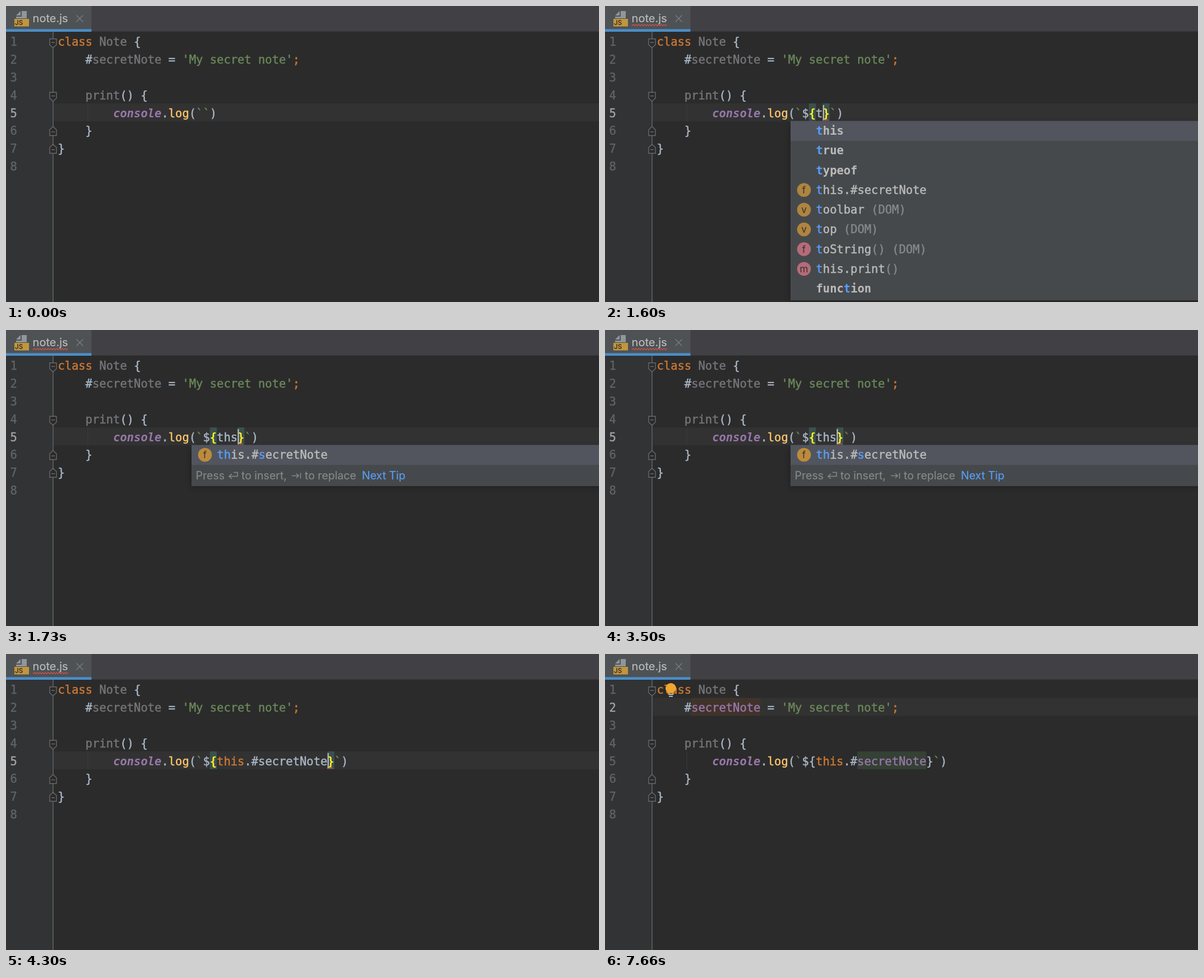
Recreate the animation shown at these times as an HTML page. Size 1058 px wide and 529 px high, loop 8 s.

```html
<!DOCTYPE html>
<html lang="en">
<head>
<meta charset="utf-8">
<title>note.js</title>
<style>
  html, body { margin: 0; width: 100%; height: 100%; overflow: hidden; background: #2b2b2b; }
  svg { display: block; width: 1058px; height: 529px; }
  .mono { font: 20.48px "DejaVu Sans Mono", monospace; stroke-width: .45px; }
  .ui { font: 19.5px Inter, sans-serif; stroke-width: .2px; }
  .bold { font-weight: bold; stroke-width: 0; }
  .em { font-weight: bold; font-style: italic; stroke-width: 0; }
</style>
</head>
<body>
<svg id="stage" viewBox="0 0 1058 529" xmlns="http://www.w3.org/2000/svg">
  <defs>
    <filter id="blur" x="-10%" y="-30%" width="120%" height="160%"><feGaussianBlur stdDeviation="6"/></filter>
  </defs>
  <rect width="1058" height="529" fill="#2b2b2b"/>
  <rect y="46" width="84" height="483" fill="#313335"/>
  <g id="editor"></g>
  <rect width="1058" height="45" fill="#414145"/>
  <rect y="45" width="1058" height="1" fill="#353537"/>
  <rect width="152.5" height="42" fill="#4e5254"/>
  <rect y="41.3" width="152.5" height="4.7" fill="#4a8ec8"/>
  <path d="M28 9H37V22H18V19H28ZM18 17L26 9V17Z" fill="#8f969c"/>
  <rect x="15" y="23" width="26" height="13.5" fill="#c2953f"/>
  <text x="16" y="34.3" font-family="Inter, sans-serif" font-size="11.5" font-weight="600" fill="#3b3222">JS</text>
  <text x="47.6" y="29" class="ui" style="font-size:20px" fill="#bbbbbb" stroke="#bbbbbb">note.js</text>
  <path d="M125.5 16.5L137.5 28.5M137.5 16.5L125.5 28.5" stroke="#797d80" stroke-width="1.4"/>
  <g id="overlay"></g>
</svg>
<script>
const LOOP = 8000;
const LEFT = 92.5, CELL = 12.33, TOP = 46.7, ROW = 31.85, BASELINE = 24.5;
const C = {
  text: '#a9b7c6', dim: '#757579', key: '#cc7832', str: '#6a8759', fn: '#ffc66d',
  field: '#9876aa', brace: '#ffef28', match: '#589df6', item: '#bbbbbb', tail: '#868788'
};
const colX = col => LEFT + col * CELL;
const rowY = row => TOP + (row - 1) * ROW;
const between = (t, a, b) => t >= a && t < b;

const rect = (x, y, w, h, fill) =>
  `<rect x="${x}" y="${y}" width="${w}" height="${h}" fill="${fill}"/>`;
const text = (x, y, str, color, cls = 'mono') =>
  `<text x="${x}" y="${y}" class="${cls}" fill="${color}" stroke="${color}">${str}</text>`;
const cells = (row, col, count, fill) =>
  rect(colX(col), rowY(row), count * CELL, ROW, fill);

// Lays out [string, colour, style] tokens one after another on the character grid.
function run(x, y, tokens) {
  return tokens.map(([str, color, cls = '']) => {
    const out = text(x, y, str, color, 'mono ' + cls);
    x += str.length * CELL;
    return out;
  }).join('');
}
const code = (row, col, tokens) => run(colX(col), rowY(row) + BASELINE, tokens);

function wave(x1, x2, y) {
  let d = `M${x1} ${y}`;
  for (let x = x1 + 2.5, up = true; x <= x2; x += 2.5, up = !up) d += `L${x} ${up ? y - 2.6 : y}`;
  return `<path d="${d}" fill="none" stroke="#d0504c" stroke-width="1.3"/>`;
}

function foldMark(row, opening) {
  const y = rowY(row) + 19.5, s = opening ? 1 : -1;
  return `<path transform="translate(84 ${y - (opening ? 0 : 1.5)}) scale(1 ${s})"
    d="M-6-7.5H6V3L0 8.5L-6 3ZM-3-1H3" fill="#2b2b2b" stroke="#68696b" stroke-width="1.4"/>`;
}

// Typed expression, highlights, popup and caret blink over time.
function stateAt(t) {
  const expr = t < 1460 ? '' : t < 1630 ? 't' : t < 1730 ? 'th' : t < 4300 ? 'ths' : 'this.#secretNote';
  const blinkOff = [[0, 30], [2330, 2730], [3130, 3500], [3900, 4300], [5130, 5660], [6160, 6460], [7660, LOOP]];
  return {
    expr,
    dollar: t >= 360,
    braces: t >= 700,
    braceMatch: between(t, 730, 6460),
    error: between(t, 1000, 4600),
    tabError: between(t, 1030, 4600),
    resolved: t >= 4530,
    usages: t >= 4560,
    popup: between(t, 1600, 1730) ? 'list' : between(t, 1730, 4300) ? 'single' : '',
    focused: t >= 3660,
    row: t < 6460 ? 5 : 2,
    caretCol: t >= 6460 ? 5 : t < 360 ? 21 : t < 700 ? 22 : 23 + expr.length,
    caret: !blinkOff.some(([a, b]) => between(t, a, b)),
    bulb: t >= 7260
  };
}

function exprTokens(s) {
  if (s.expr.length < 4) return [[s.expr, C.text]];
  return [['this', C.key], ['.#', C.text], ['secretNote', s.resolved ? C.field : C.text]];
}

function editor(s) {
  const close = 23 + s.expr.length;
  let out = rect(85, rowY(s.row), 973, ROW, '#323232');
  if (s.usages) out += cells(2, 5, 10, '#40332b') + cells(5, 29, 10, '#344134');
  if (s.braceMatch) out += cells(5, 22, 1, '#3b514d') + cells(5, close, 1, '#3b514d');
  out += rect(145.5, rowY(5), 1, ROW, '#3d3d3d');
  out += rect(83, 46, 2, 483, '#555657');
  out += foldMark(1, true) + foldMark(4, true) + foldMark(6, false) + foldMark(7, false);
  for (let n = 1; n <= 8; n++) out += text(7.5, rowY(n) + BASELINE, n, n === s.row ? '#a4a3a3' : '#606366');

  out += code(1, 0, [['class', C.key]]) + code(1, 6, [['Note', C.dim]]) + code(1, 11, [['{', C.text]]);
  out += code(2, 4, [['#', C.text], ['secretNote', s.resolved ? C.field : C.dim]]);
  out += code(2, 16, [['=', C.text]]) + code(2, 18, [["'My secret note'", C.str], [';', C.key]]);
  out += code(4, 4, [['print', C.dim], ['()', C.text]]) + code(4, 12, [['{', C.text]]);

  const brace = s.braceMatch ? [C.brace, 'bold'] : [C.text];
  const line = [['console', C.field, 'em'], ['.', C.text], ['log', C.fn], ['(', C.text], ['`', C.str]];
  if (s.dollar) line.push(['$', s.braces ? C.text : C.str]);
  if (s.braces) line.push(['{', ...brace], ...exprTokens(s), ['}', ...brace]);
  line.push(['`', C.str], [')', C.text]);
  out += code(5, 8, line) + code(6, 4, [['}', C.text]]) + code(7, 0, [['}', C.text]]);

  if (s.error) out += wave(colX(close), colX(close + 1), rowY(5) + 31);
  if (s.caret) out += rect(colX(s.caretCol) + .3, rowY(s.row) + 3, 2.2, 27, '#bbbbbb');
  return out;
}

const badge = (y, letter, fill) =>
  `<circle cx="355" cy="${y}" r="12.3" fill="${fill}"/>
   <text x="355" y="${y + 6}" text-anchor="middle" font-family="Inter, sans-serif" font-size="17" fill="#35302b">${letter}</text>`;

const AMBER = '#ae8440', ROSE = '#b56b79';
const keyword = (first, rest) => ({ parts: [[first, C.match, 'bold'], [rest, C.item, 'bold']] });
const member = (letter, fill, name, tail = '', dom = false) =>
  ({ letter, fill, dom, parts: [['t', C.match], [name, C.item], [tail, C.tail]] });
const ITEMS = [
  keyword('t', 'his'), keyword('t', 'rue'), keyword('t', 'ypeof'),
  member('f', AMBER, 'his.#secretNote'),
  member('v', AMBER, 'oolbar', '', true),
  member('v', AMBER, 'op', '', true),
  member('f', ROSE, 'oString', '()', true),
  member('m', ROSE, 'his.print', '()'),
  { parts: [['func', C.item, 'bold'], ['t', C.match, 'bold'], ['ion', C.item, 'bold']] }
];
const SINGLE = [{
  letter: 'f', fill: '#bd8b3c',
  parts: [['th', C.match], ['is.#', C.item], ['s', C.match], ['ecretNote', C.item]]
}];

function popup(s) {
  const list = s.popup === 'list';
  const bottom = list ? 526 : 279;
  let out = `<rect x="331" y="210" width="760" height="${bottom - 210}" opacity=".3" filter="url(#blur)"/>`;
  out += rect(331, 205.5, 727, bottom - 205.5, '#46494b');
  out += rect(331, 205.5, 727, 35.5, s.focused ? '#113a5c' : '#52555e');
  (list ? ITEMS : SINGLE).forEach((item, i) => {
    const y = 223 + i * 35.25;
    const length = item.parts.reduce((sum, [str]) => sum + str.length, 0);
    if (item.letter) out += badge(y, item.letter, item.fill);
    out += run(376.5, y + 7.2, item.parts);
    if (item.dom) out += text(376.5 + (length + 1) * CELL, y + 7.2, '(DOM)', C.tail);
  });
  if (!list) out += hint();
  return out;
}

function hint() {
  const y = 267.3;
  return text(338.6, y, 'Press', C.tail, 'ui') + text(420, y, 'to insert,', C.tail, 'ui') +
    text(533, y, 'to replace', C.tail, 'ui') + text(635, y, 'Next Tip', C.match, 'ui') +
    `<path d="M403 257L398 261.5L403 266M398 261.5H413V254.5H406M510 260.5H522M518 256.5L522 260.5L518 264.5M525.5 255.5V265.5"
      fill="none" stroke="${C.tail}" stroke-width="1.6"/>`;
}

const bulb = () =>
  `<path d="M113 70C112 68 108 66 108 61.3A9.4 9.4 0 0 1 126.8 61.3C126.8 66 123 68 122 70Z" fill="#f0a530"/>` +
  rect(112.8, 71, 9.4, 2, '#c4c4c4') + rect(114, 74.6, 7, 2, '#c4c4c4');

function overlay(s) {
  return (s.tabError ? wave(48, 112, 35.5) : '') + (s.popup ? popup(s) : '') + (s.bulb ? bulb() : '');
}

const editorLayer = document.getElementById('editor');
const overlayLayer = document.getElementById('overlay');
const start = performance.now();
let shown = '';

function draw(now) {
  const state = stateAt(Math.max(0, now - start) % LOOP);
  const key = JSON.stringify(state);
  if (key !== shown) {
    shown = key;
    editorLayer.innerHTML = editor(state);
    overlayLayer.innerHTML = overlay(state);
  }
  requestAnimationFrame(draw);
}
draw(start);
</script>
</body>
</html>
```
